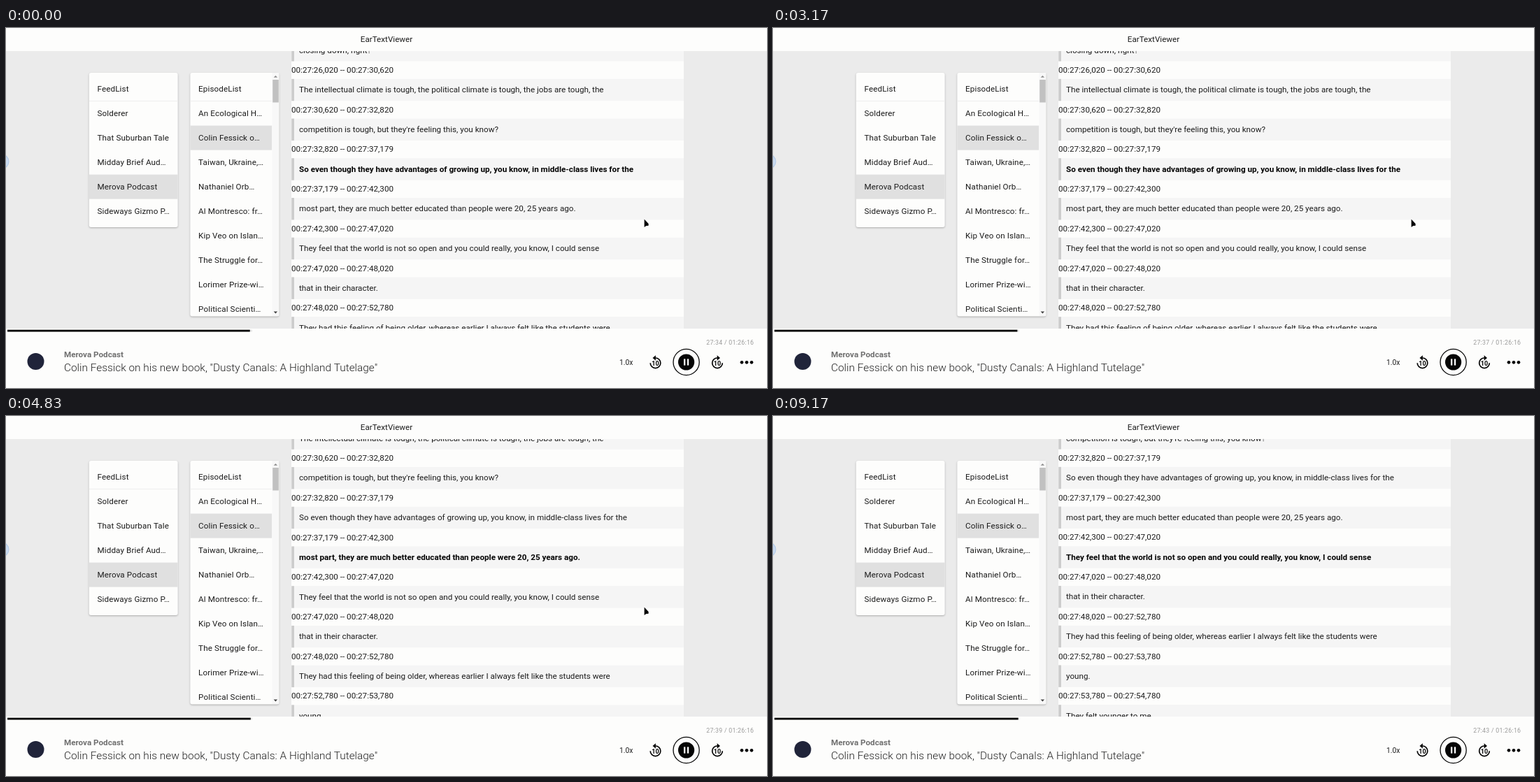
These frames come from a looping animation (1088x515 px, 9.34 s). An HTML page with a canvas:

```html
<!DOCTYPE html>
<html lang="en">
<head>
<meta charset="utf-8">
<title>Podcast transcript player</title>
<style>
  html, body { margin: 0; width: 100%; height: 100%; overflow: hidden; background: #fdfdfc; }
  canvas { display: block; }
</style>
</head>
<body>
<canvas id="stage" width="1088" height="515"></canvas>
<script>
const ctx = document.getElementById('stage').getContext('2d');
const LOOP = 9340;
const WHITE = '#fdfdfc', GREY = '#ebebeb', INK = '#1c1c1c', BLACK = '#050505';
const BODY = 11.67, ROW = 35, PITCH = 56.72;

const feeds = ['Solderer', 'That Suburban Tale', 'Midday Brief Aud…', 'Merova Podcast', 'Sideways Gizmo P…'];
const episodes = ['An Ecological H…', 'Colin Fessick o…', 'Taiwan, Ukraine,…', 'Nathaniel Orb…', 'Al Montresco: fr…',
  'Kip Veo on Islan…', 'The Struggle for…', 'Lorimer Prize-wi…', 'Political Scienti…'];

// Each cue: start time and line; a cue ends where the next begins.
const cues = [
  ['24,020', 'closing down, right?'],
  ['26,020', 'The intellectual climate is tough, the political climate is tough, the jobs are tough, the'],
  ['30,620', "competition is tough, but they're feeling this, you know?"],
  ['32,820', 'So even though they have advantages of growing up, you know, in middle-class lives for the'],
  ['37,179', 'most part, they are much better educated than people were 20, 25 years ago.'],
  ['42,300', 'They feel that the world is not so open and you could really, you know, I could sense'],
  ['47,020', 'that in their character.'],
  ['48,020', 'They had this feeling of being older, whereas earlier I always felt like the students were'],
  ['52,780', 'young.'],
  ['53,780', 'They felt younger to me.'],
  ['54,780', '']
];

const ticks = [600, 1580, 2580, 3830, 4580, 5580, 6580, 7580, 8580];
const jumps = [3420, 8420];
const JUMP_MS = 160;
const POINTER_HIDES = 5500;

const clamp = v => Math.min(1, Math.max(0, v));
const ease = v => v * v * (3 - 2 * v);

function rect(x, y, w, h, fill) {
  ctx.fillStyle = fill;
  ctx.fillRect(x, y, w, h);
}

function disc(x, y, r, fill) {
  ctx.fillStyle = fill;
  ctx.beginPath();
  ctx.arc(x, y, r, 0, Math.PI * 2);
  ctx.fill();
}

function polygon(points, fill) {
  ctx.fillStyle = fill;
  ctx.beginPath();
  points.forEach(([x, y]) => ctx.lineTo(x, y));
  ctx.closePath();
  ctx.fill();
}

// Text whose capitals are centred on y.
function text(str, x, y, { size = BODY, weight = 400, fill = INK, align = 'left', gap = 0 } = {}) {
  ctx.font = `${weight} ${size}px Roboto, sans-serif`;
  ctx.letterSpacing = gap + 'px';
  ctx.textAlign = align;
  ctx.fillStyle = fill;
  ctx.fillText(str, x, y + size * 0.36);
}

function clipped(x, y, w, h, draw) {
  ctx.save();
  ctx.beginPath();
  ctx.rect(x, y, w, h);
  ctx.clip();
  draw();
  ctx.restore();
}

function scrollArrow(x, y, dir, fill) {
  polygon([[x - 2.7, y - 1.4 * dir], [x + 2.7, y - 1.4 * dir], [x, y + 1.4 * dir]], fill);
}

function card(x, y, w, h, rowW, title, items, selected) {
  ctx.save();
  ctx.shadowColor = 'rgba(0,0,0,0.28)';
  ctx.shadowBlur = 2.5;
  ctx.shadowOffsetY = 1;
  ctx.fillStyle = WHITE;
  ctx.beginPath();
  ctx.roundRect(x, y, w, h, 3);
  ctx.fill();
  ctx.restore();
  clipped(x, y, w, h, () => {
    text(title, x + 11.8, 87, { gap: 0.11 });
    rect(x, 104, rowW, 0.8, '#ececec');
    items.forEach((item, i) => {
      const top = 104.6 + ROW * i;
      if (i === selected) rect(x, top, rowW, ROW, '#e0e0e0');
      text(item, x + 11.8, top + 17.5, { gap: 0.11 });
    });
  });
}

function transcript(t) {
  const scroll = jumps.reduce((sum, at) => sum + ease(clamp((t - at) / JUMP_MS)), 0);
  const active = 3 + jumps.filter(at => t >= at).length;
  const base = 201.5 + 0.2 * (1 - Math.abs(scroll - 1));
  clipped(408, 33, 561, 397, () => {
    rect(408, 33, 561, 397, WHITE);
    for (let i = 0; i < cues.length - 1; i++) {
      const y = base + PITCH * (i - 3 - scroll);
      if (y < 0 || y > 475) continue;
      rect(408.3, y - 15.2, 560.7, 31.4, '#f5f5f5');
      rect(408.3, y - 15.2, 3.6, 31.4, '#cbcbcb');
      text(`00:27:${cues[i][0]} -- 00:27:${cues[i + 1][0]}`, 408, y - PITCH / 2);
      text(cues[i][1], 419, y, { weight: i === active ? 700 : 400, fill: i === active ? BLACK : INK });
    }
  });
}

// dir 1 skips back, -1 skips forward.
function skipButton(x, y, dir) {
  ctx.save();
  ctx.translate(x, y);
  ctx.scale(dir, 1);
  ctx.strokeStyle = BLACK;
  ctx.lineWidth = 1.7;
  ctx.beginPath();
  ctx.arc(0, 0, 7.3, -Math.PI / 2, Math.PI);
  ctx.stroke();
  polygon([[0.4, -11], [0.4, -3.6], [-4, -7.3]], BLACK);
  ctx.restore();
  text('10', x, y + 0.2, { size: 9, weight: 700, fill: BLACK, align: 'center' });
}

function player(t) {
  const sec = 34 + ticks.filter(at => t >= at).length;
  const done = (27 * 60 + sec) / (86 * 60 + 16);
  rect(0, 430, 1088, 85, WHITE);
  rect(2, 431.7, 350, 2.8, '#e6e6e6');
  rect(2, 431.7, 1 + 1082 * done, 2.8, BLACK);

  disc(42.5, 477, 12, '#20243a');
  text('Merova Podcast', 83, 467, { weight: 700, fill: '#707070' });
  text('Colin Fessick on his new book, "Dusty Canals: A Highland Tutelage"', 83, 485.3,
    { size: 15.4, weight: 300, fill: '#222' });
  text(`27:${sec} / 01:26:16`, 1069.3, 450, { size: 8.75, fill: '#9a9a9a', align: 'right', gap: 0.29 });
  text('1.0x', 877, 478.3, { size: 10.2 });

  skipButton(928.5, 479.3, 1);
  skipButton(1017, 479.3, -1);
  ctx.strokeStyle = BLACK;
  ctx.lineWidth = 1.3;
  ctx.beginPath();
  ctx.arc(972.6, 478, 18.6, 0, Math.PI * 2);
  ctx.stroke();
  disc(972.6, 478, 11.6, BLACK);
  rect(969, 473.4, 2.3, 9.2, WHITE);
  rect(973.9, 473.4, 2.3, 9.2, WHITE);
  for (const x of [1052, 1059, 1066]) disc(x, 478.3, 2.35, BLACK);
}

function pointer(x, y) {
  ctx.lineJoin = 'round';
  ctx.lineWidth = 1.6;
  ctx.strokeStyle = '#fff';
  polygon([[x, y], [x, y + 11.6], [x + 2.6, y + 9.6], [x + 6, y + 9.4], [x + 6, y + 6.5]], BLACK);
  ctx.stroke();
  ctx.fill();
}

function draw(t) {
  rect(0, 0, 1088, 515, GREY);
  rect(0, 0, 1088, 33, WHITE);
  text('EarTextViewer', 544, 15.5, { align: 'center' });

  disc(-6, 191, 10.5, '#b4cbe8');
  disc(-6, 191, 9.3, '#cbdcf1');

  card(118.7, 64, 127, 221, 127, 'FeedList', feeds, 3);
  card(263.3, 64, 127, 348.5, 117, 'EpisodeList', episodes, 1);
  rect(380.4, 64, 9.9, 348, '#f8f8f8');
  rect(381.2, 74, 8.6, 32.5, '#c1c1c1');
  scrollArrow(385.4, 69.3, -1, '#8c8c8c');
  scrollArrow(385.4, 407, 1, '#404040');

  transcript(t);
  player(t);
  if (t < POINTER_HIDES) pointer(912.6, 273.4);
}

const start = performance.now();
function frame() {
  draw((performance.now() - start) % LOOP);
  requestAnimationFrame(frame);
}
frame();
</script>
</body>
</html>
```
